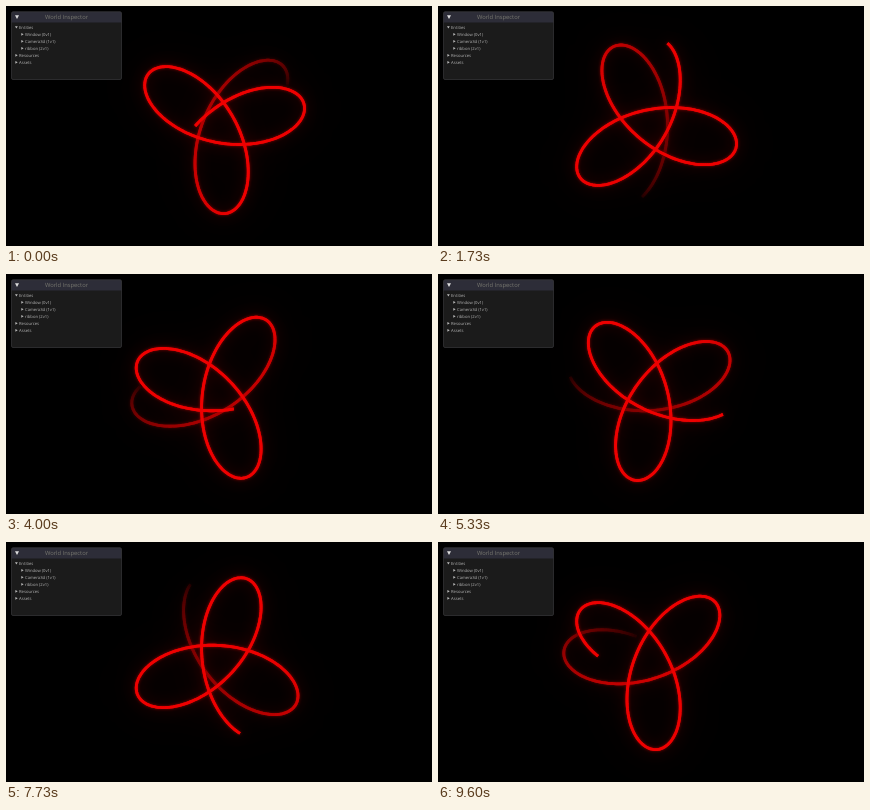
Recreate the animation shown at these times as an HTML page with a canvas. Size 426 by 240 pixels, loop 9670 ms.

```html
<!DOCTYPE html>
<html lang="en">
<head>
<meta charset="utf-8">
<title>Ribbon trail</title>
<style>
  html, body { margin: 0; width: 100%; height: 100%; overflow: hidden; background: #000; }
  canvas, svg { position: absolute; left: 0; top: 0; width: 426px; height: 240px; }
  text { font-family: "Open Sans", "Noto Sans", sans-serif; text-rendering: geometricPrecision; }
  .row { font-size: 4.2px; fill: #b4b4b4; }
  .title { font-size: 5.8px; fill: #787870; text-anchor: middle; }
  .arrow { fill: #bbb; }
</style>
</head>
<body>
<canvas id="stage" width="426" height="240"></canvas>
<svg viewBox="0 0 426 240">
  <defs>
    <path id="open" class="arrow" d="M-1.4 -1h2.8L0 1.3z"/>
    <path id="shut" class="arrow" d="M-1 -1.4v2.8L1.3 0z"/>
  </defs>
  <rect x="5.5" y="5.8" width="110" height="67.7" rx="1.5" fill="#1b1b1b"/>
  <path d="M5.5 16.5V7.3q0-1.5 1.5-1.5h107q1.5 0 1.5 1.5v9.2z" fill="#2d2d38"/>
  <rect x="5.5" y="5.8" width="110" height="67.7" rx="1.5" fill="none" stroke="#38383c" stroke-width=".7"/>
  <path d="M9 9.3h4L11 12.9z" fill="#ddd"/>
  <text class="title" x="60.5" y="12.6">World Inspector</text>
  <use href="#open" x="10.4" y="21.3"/><text class="row" x="13" y="22.8">Entities</text>
  <use href="#shut" x="16.3" y="28.3"/><text class="row" x="19" y="29.8">Window (0v1)</text>
  <use href="#shut" x="16.3" y="35.3"/><text class="row" x="19" y="36.8">Camera3d (1v1)</text>
  <use href="#shut" x="16.3" y="42.3"/><text class="row" x="19" y="43.8">ribbon (2v1)</text>
  <use href="#shut" x="10.4" y="49.3"/><text class="row" x="13" y="50.8">Resources</text>
  <use href="#shut" x="10.4" y="56.3"/><text class="row" x="13" y="57.8">Assets</text>
</svg>
<script>
const W = 426, H = 240, LOOP = 9670, STEP = 1000 / 15;
const K = 0.64, L = 0.384, SCALE = 144.9;
const SPAN = 15, SEGMENTS = 360;

const PHASE = [
  [0, 46.5], [1730, 63.98], [4000, 86.65], [5330, 99.81],
  [6330, 109.96], [7730, 123.93], [9600, 141.95]
];

const ctx = document.getElementById('stage').getContext('2d');
const layer = document.createElement('canvas');
layer.width = W;
layer.height = H;
const pen = layer.getContext('2d');

function headPhase(ms) {
  let i = 1;
  while (i < PHASE.length - 1 && ms > PHASE[i][0]) i++;
  const [t0, p0] = PHASE[i - 1], [t1, p1] = PHASE[i];
  return p0 + (p1 - p0) * (ms - t0) / (t1 - t0);
}

// Spirograph curve.
function point(a) {
  const b = a * (1 - K) / K;
  return [
    W / 2 + SCALE * ((1 - K) * Math.cos(a) + L * K * Math.cos(b)),
    H / 2 - SCALE * ((1 - K) * Math.sin(a) - L * K * Math.sin(b))
  ];
}

// Overbright linear red, clamped and gamma encoded.
function color(life) {
  const light = Math.min(1, 3 * life);
  return `rgb(${Math.round(238 * Math.pow(light, 1 / 2.2))},0,0)`;
}

function drawRibbon(head) {
  pen.clearRect(0, 0, W, H);
  pen.lineWidth = 2.8;
  const at = i => point(head - SPAN * (1 - i / SEGMENTS));
  for (let i = 2; i < SEGMENTS; i++) {
    pen.strokeStyle = color(i / SEGMENTS);
    pen.beginPath();
    pen.moveTo(...at(i));
    pen.lineTo(...at(i + 1));
    if (i + 2 <= SEGMENTS) pen.lineTo(...at(i + 2));
    pen.stroke();
  }
}

function glow(radius, alpha) {
  ctx.filter = radius ? `blur(${radius}px)` : 'none';
  ctx.globalAlpha = alpha;
  ctx.drawImage(layer, 0, 0);
}

function draw(ms) {
  drawRibbon(headPhase(ms));
  ctx.globalCompositeOperation = 'source-over';
  ctx.globalAlpha = 1;
  ctx.filter = 'none';
  ctx.fillStyle = '#000';
  ctx.fillRect(0, 0, W, H);
  ctx.globalCompositeOperation = 'lighter';
  glow(20, 0.25);
  glow(7, 0.25);
  glow(1.6, 0.5);
  ctx.globalCompositeOperation = 'source-over';
  glow(0, 1);
}

// Start of the 15 fps step showing at t, on a 10 ms grid.
function stepStart(t) {
  const start = k => Math.round(k * STEP / 10) * 10;
  const k = Math.floor((t + 3.5) / STEP);
  return start(k) > t ? start(k - 1) : start(k);
}

let shown = -1;
const origin = performance.now();
function tick() {
  const ms = stepStart((performance.now() - origin) % LOOP);
  if (ms !== shown) draw(shown = ms);
  requestAnimationFrame(tick);
}
tick();
</script>
</body>
</html>
```
